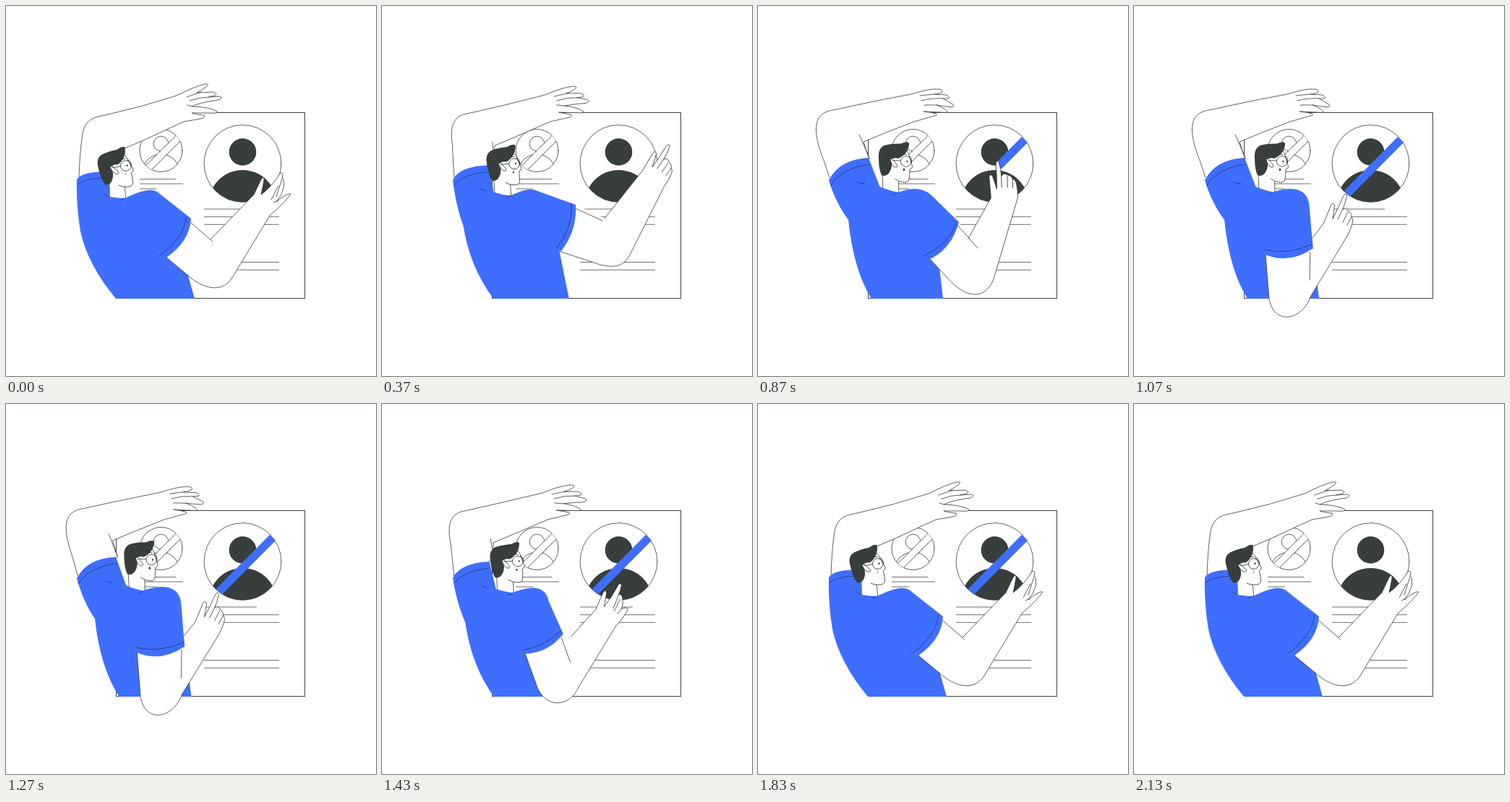
These frames come from a looping animation (512 by 512 pixels, 2500 ms). An HTML page:

```html
<!DOCTYPE html>
<html lang="en">
<head>
<meta charset="utf-8">
<title>Crossing out a profile</title>
<style>
html, body { margin: 0; width: 100%; height: 100%; overflow: hidden; background: #fff; }
svg { display: block; width: 100vw; height: 100vh; }
.line { fill: none; stroke: #333a37; stroke-width: .8; stroke-linejoin: round; stroke-linecap: round; }
.skin { fill: #fff; stroke: #333a37; stroke-width: .8; stroke-linejoin: round; }
.white { fill: #fff; }
.blue { fill: #3f6eff; }
.dark { fill: #373e3b; }
.fold { fill: none; stroke: #24398a; stroke-width: .9; }
.rule { fill: none; stroke: #6b706e; stroke-width: 1; }
</style>
</head>
<body>
<svg viewBox="0 0 512 512">
  <defs>
    <clipPath id="big"><circle cx="327.5" cy="218" r="53.2"/></clipPath>
    <clipPath id="small"><circle cx="214.5" cy="200" r="29.5"/></clipPath>
  </defs>

  <rect x="152.5" y="147.5" width="261" height="257" fill="#fff" stroke="#3c423f"/>
  <path class="rule" d="M185 239.5H235M185 246H245M185 253H209M274 281H347M274 291.7H378M274 302.3H378M274 354.5H378M274 365.2H378"/>
  <circle class="line" cx="214.5" cy="200" r="29.5"/>
  <g clip-path="url(#small)">
    <circle class="line" cx="214.5" cy="190.5" r="10.3"/>
    <circle class="line" cx="214.5" cy="231" r="26"/>
    <path class="skin" d="M239 175.5L190 224L197 231L246 182Z"/>
  </g>
  <circle class="line" cx="327.5" cy="218" r="53.4"/>
  <circle class="dark" cx="327.5" cy="202" r="18.8"/>
  <circle class="dark" cx="327.5" cy="274" r="47" clip-path="url(#big)"/>
  <path id="bar" fill="none" stroke="#3f6eff" stroke-width="11.3"/>

  <path id="backArm" class="skin"/>
  <path id="backLines" class="line"/>
  <path id="neck" class="skin"/>
  <path id="torso" class="blue"/>
  <path id="folds" class="fold"/>

  <g id="head">
    <path class="white" d="M178 205L206 200L205 235L190 240L178 232Z"/>
    <path class="skin" d="M206 200Q209 204 210 210L213.5 222Q214 225 210 226Q210 234 209 240Q208 245 201 244Q194 243 189 239"/>
    <path class="dark" d="M209.3 190Q207 186.5 198 190.5Q186 190 176 192.5Q166 196 167 210Q167 226 171 234Q177 237 182 230Q187 222 184 212Q190 209 194 211Q208 205 209.3 190Z"/>
    <path class="skin" d="M183 212Q186 209 190 217Q195 222 191 223.5Q185 222 183 212Z"/>
    <path class="line" d="M186 213.5L197.5 214M209 207.5Q213 208 212.5 217M200.5 205.5Q203 204 206 205.5"/>
    <circle class="line" cx="204.7" cy="215" r="7.3"/>
    <circle class="dark" cx="206.5" cy="215" r="1.2"/>
    <ellipse id="mouth" class="dark" cx="202" cy="226.5" rx="1.3"/>
  </g>

  <path id="armFill" class="white"/>
  <path id="armLines" class="line"/>
  <g id="hand">
    <path id="palm" class="skin"/>
    <path id="fingers" class="line"/>
  </g>
  <path id="sleeve" class="blue"/>
  <path id="cuff" class="fold"/>
</svg>
<script>
const LOOP = 2500;
const el = id => document.getElementById(id);
const set = (id, name, value) => el(id).setAttribute(name, value);
const draw = (id, d) => set(id, 'd', d);
const clamp = x => Math.min(1, Math.max(0, x));
const mix = (a, b, k) => a + (b - a) * k;

// Blend two path strings that share the same commands.
function blend([a, b], k) {
  const to = b.match(/-?[\d.]+/g);
  let i = 0;
  return a.replace(/-?[\d.]+/g, n => mix(+n, +to[i++], k).toFixed(2));
}

// Monotone cubic interpolation, flat at both ends.
function ease(times, values, t) {
  const last = times.length - 1;
  if (t <= times[0]) return values[0];
  if (t >= times[last]) return values[last];
  const rate = i => (values[i + 1] - values[i]) / (times[i + 1] - times[i]);
  const slope = i => {
    if (i === 0 || i === last) return 0;
    const l = rate(i - 1), r = rate(i);
    return l * r <= 0 ? 0 : 2 * l * r / (l + r);
  };
  let i = 0;
  while (t > times[i + 1]) i++;
  const h = times[i + 1] - times[i], s = (t - times[i]) / h, q = s * s, c = q * s;
  return values[i] * (2 * c - 3 * q + 1) + values[i + 1] * (3 * q - 2 * c) +
    h * (slope(i) * (c - 2 * q + s) + slope(i + 1) * (c - q));
}

// Body shapes: resting, then leaning in.
const BODY = {
  backArm: [
    'M101 238Q102 205 105 183C107 166 112 155 133 152L186 139L236 124' +
    'Q262 111 275 108Q283 107 277 112Q270 117 264 120L286 119Q294 121 289 124L280 126' +
    'L296 125Q301 127 294 130Q270 133 257 139Q284 140 292 146Q294 149 280 148L257 148' +
    'Q268 151 274 151Q277 154 270 156L246 160L190 186L164 197L156 215L120 240',
    'M99 238Q93 218 88 206C79 180 72 148 104 144L160 132L212 122' +
    'Q236 114 251 115Q259 117 253 120Q250 122 244 122L260 123Q268 127 263 128L256 128' +
    'L268 135Q274 138 268 140Q258 139 247 137Q258 141 262 146Q264 148 252 147L229 146' +
    'Q240 147 246 149Q250 151 244 152L216 160L180 174L146 188L154 212L120 235'],
  backLines: [
    'M163 197L156 215M250 126L270 119M254 131Q268 126 280 126M251 137L257 139',
    'M140 178L154 210M224 124L244 122M226 131Q240 127 256 128M230 137L247 137'],
  neck: [
    'M141 246L143 268L166 268L164 248',
    'M172 232L173 256L195 260L194.5 240'],
  torso: [
    'M98 240Q104 229 143 229L144 264Q155 266 165 266Q190 253 212 261L232 300L242 338' +
    'L261 405L152 405Q113 358 103 312Q97 275 98 240Z',
    'M98 241Q113 212 153 210L168.5 250Q182 256 195 258Q215 250 228 256L243 300L247 326' +
    'L256 405L157 405Q132 365 125 296Q107 272 98 241Z'],
  folds: [
    'M99 247Q112 238 138 238M135 259Q138 263 142 264M158 269L165 266',
    'M100 249Q116 224 155 219M138 244Q142 246 148 245.5M187 262L195 258']
};

// Hand shapes around the index fingertip: open, then pointing.
const PALM = [
  'M-38 30L-28 9Q-24 3 -24 10Q-26 21 -28 30Q-13 19 -2 1Q1 -2 2 3Q2 5 1 7' +
  'Q5 9 3 21Q1 31 -7 40Q9 27 13 29Q5 41 -16 59',
  'M-32 40L-21 14Q-18 9 -16 14Q-17 22 -19 33Q-11 18 -4 2Q-1 -3 1 1Q-1 11 -5 20' +
  'Q1 17 3 23Q7 25 7 31Q10 34 8 40Q6 48 1 57'];
const FINGERS = [
  'M-7 33L1 8M-14 37L-4 18M-11 41L-6 39',
  'M-12 34L-5 20M-5 38L2 24M1 42L7 31'];

// Front arm poses; hand = x, y, turn, pointing.
const REST = {
  sleeve: [165,266, 185,256, 203,249, 214,261, 256,294, 254,326, 222,348, 212,344],
  cuff: [250,291, 246,322, 212,346],
  elbow: [252,373, 278,396, 302,394, 313,376],
  crease: [283,323, 256,300, 286,326],
  hand: [381,231, 0, 0]
};
const RAISE = {
  sleeve: [178,262, 192,257, 203,250, 215,256, 268,275, 270,312, 247,340, 242,337],
  cuff: [262,273, 264,308, 241,336],
  elbow: [290,354, 318,365, 334,362, 343,344],
  crease: [308,294, 267,280, 305,297],
  hand: [397.5,193, 8, 1]
};
const REACH = {
  sleeve: [190,259, 200,255, 208,251, 220,254, 277,267, 285,302, 264,333, 247,326],
  cuff: [271,266, 276,300, 259,330],
  elbow: [310,342, 336,348, 353,345, 359,320],
  crease: [317,282, 277,271, 320,283],
  hand: [390,167, 0, 1]
};
const DRAG = {
  sleeve: [195,258, 212,250, 229,252, 239,261, 278,299, 268,336, 238,350, 229,346],
  cuff: [274,302, 262,332, 229,346],
  elbow: [263,377, 288,405, 316,408, 327,375],
  crease: [291,322, 276,303, 304,335],
  hand: [332,215, -28, 1]
};
const LOW = {
  sleeve: [190,258, 215,250, 243,248, 243,282, 247,336, 213,358, 181,344, 179,335],
  cuff: [246,330, 213,345, 180,337],
  elbow: [185,398, 186,442, 229,440, 243,402],
  crease: [246,321, 243,341, 242,380],
  hand: [293,262, 0, 1]
};
const BACK = {};
for (const part in REST) BACK[part] = REST[part].map((v, i) => mix(LOW[part][i], v, .95));

const ARM_TIMES = [30, 370, 530, 870, 1090, 1250, 1630, 1830];
const ARM_POSES = [REST, RAISE, REACH, DRAG, LOW, LOW, BACK, REST];
const LEAN_TIMES = [30, 370, 530, 870, 1070, 1270, 1630, 1830];
const LEAN = [0, .44, .86, 1, 1, .91, .1, 0];

function drawBody(lean) {
  for (const id in BODY) draw(id, blend(BODY[id], lean));
  const rest = 1 - lean;
  set('head', 'transform', `translate(${-38 * rest} ${10 * rest}) rotate(${-13 * rest} 187 217)`);
  set('mouth', 'ry', .5 + 1.5 * lean);
}

function drawArm(t) {
  const part = name => REST[name].map((_, i) => ease(ARM_TIMES, ARM_POSES.map(p => p[name][i]), t));
  const [x, y, turn, point] = part('hand');
  const s = part('sleeve'), e = part('elbow'), c = part('crease'), f = part('cuff');
  const sin = Math.sin(turn * Math.PI / 180), cos = Math.cos(turn * Math.PI / 180);
  const place = (u, v) => [x + u * cos - v * sin, y + u * sin + v * cos];
  const inner = place(mix(-38, -32, point), mix(30, 40, point));
  const outer = place(mix(-16, 1, point), mix(59, 57, point));
  const under = `M${s.slice(12, 14)}L${e.slice(0, 2)}C${e.slice(2)}L${outer}`;

  draw('armFill', `${under}L${place(-14, 38)}L${inner}L${c.slice(0, 2)}L${s.slice(8, 10)}Z`);
  draw('armLines', `${under}M${inner}L${c.slice(0, 2)}M${c.slice(2, 4)}L${c.slice(4)}`);
  set('hand', 'transform', `translate(${x} ${y}) rotate(${turn})`);
  draw('palm', blend(PALM, point));
  draw('fingers', blend(FINGERS, point));
  draw('sleeve', `M${s.slice(0, 2)}C${s.slice(2, 8)}L${s.slice(8, 10)}Q${s.slice(10, 14)}L${s.slice(14)}Z`);
  draw('cuff', `M${f.slice(0, 2)}Q${f.slice(2)}`);
  return x;
}

function drawBar(t, tipX) {
  const p = t < 1090 ? clamp((368.5 - tipX) / 75) : 1;
  const fade = 1 - clamp((t - 2000) / 130);
  draw('bar', `M369 185L${369 - 74 * p} ${185 + 74.5 * p}`);
  set('bar', 'opacity', p > 0 ? fade : 0);
}

function frame() {
  const t = performance.now() % LOOP;
  drawBody(ease(LEAN_TIMES, LEAN, t));
  drawBar(t, drawArm(t));
  requestAnimationFrame(frame);
}
frame();
</script>
</body>
</html>
```
